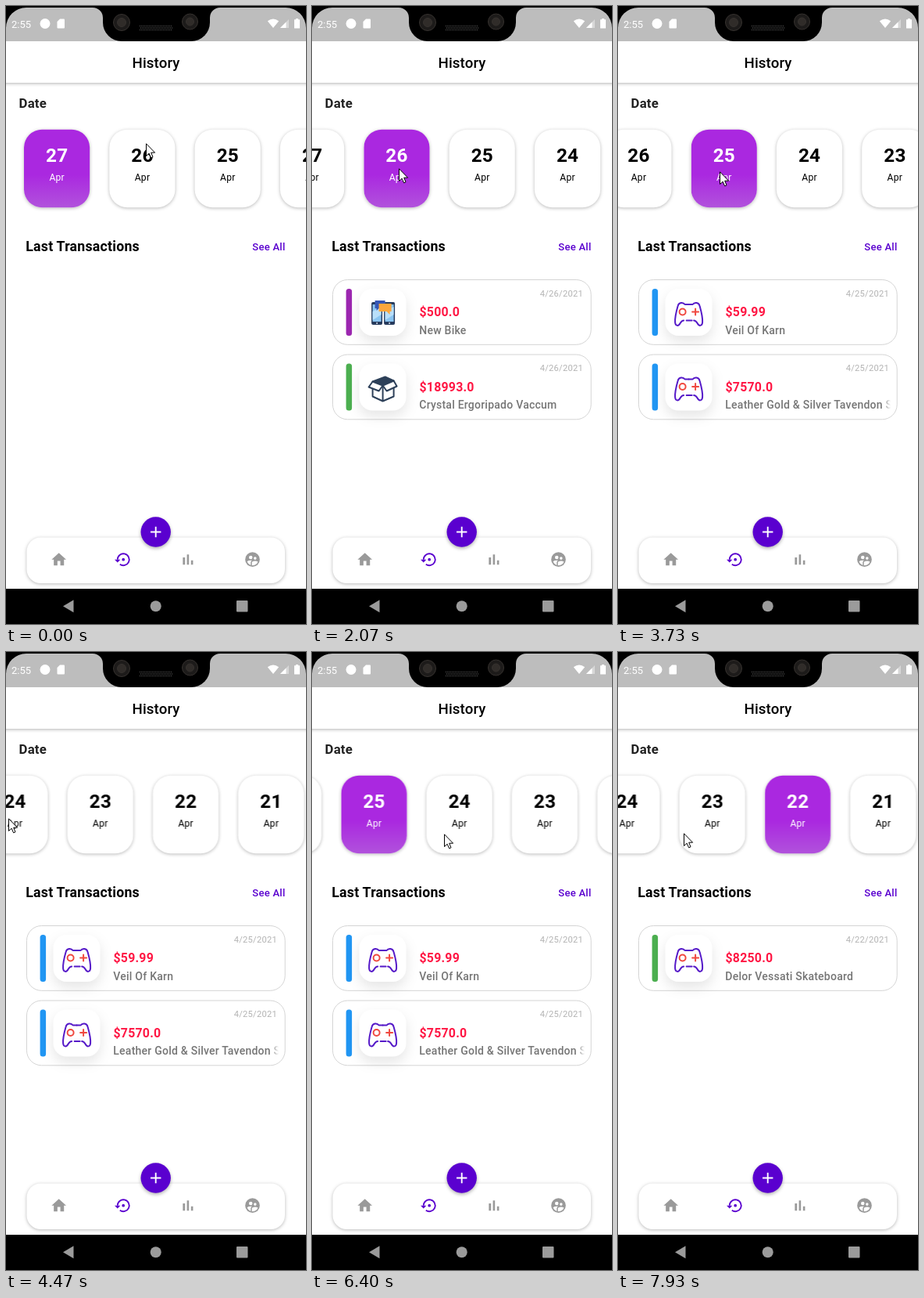
An HTML page that plays this animation: 384x789 px, repeating every 8 s.

```html
<!DOCTYPE html>
<html lang="en">
<head>
<meta charset="utf-8">
<title>History</title>
<style>
  html, body { margin: 0; width: 100%; height: 100%; overflow: hidden; background: #fff; }
  svg { display: block; font-family: Roboto, sans-serif; letter-spacing: .23px; }
  .b { font-weight: 700; }
  .m { font-weight: 500; }
  .c { text-anchor: middle; }
  .bar { filter: drop-shadow(0 1.5px 2px rgba(0,0,0,.3)); }
  .card { filter: drop-shadow(0 1.5px 2px rgba(0,0,0,.28)); }
  .tile { filter: drop-shadow(0 7px 8px rgba(0,0,0,.1)); }
  .fab { filter: drop-shadow(0 2px 2px rgba(0,0,0,.3)); }
</style>
</head>
<body>
<svg width="384" height="789" viewBox="0 0 384 789">
  <defs>
    <linearGradient id="violet" x2="0" y2="1">
      <stop offset=".58" stop-color="#aa28e0"/>
      <stop offset="1" stop-color="#b152dc"/>
    </linearGradient>
    <linearGradient id="fade" gradientUnits="userSpaceOnUse" x1="339" x2="349" y1="0" y2="0">
      <stop stop-color="#757575"/>
      <stop offset="1" stop-color="#757575" stop-opacity="0"/>
    </linearGradient>
    <clipPath id="row"><rect y="154" width="384" height="110"/></clipPath>
    <g id="pad" fill="none" stroke="#5519c8" stroke-width="2" stroke-linecap="round" stroke-linejoin="round">
      <path id="grip" d="M0-11H-5C-7-14-13-14-14-9C-16-2-18 6-17.500 12C-17 17-13 17-11 13C-9.500 10.500-8.500 9.500-6.500 9.500"/>
      <use href="#grip" transform="scale(-1 1)"/>
      <path d="M-3 9.500H4"/>
      <path stroke="#f0483f" d="M4.500-1.500H12.500M8.500-5.500V2.500M-4-1.500A4 4 0 1 1-12-1.500A4 4 0 1 1-4-1.500"/>
    </g>
    <g id="phones">
      <g id="phone">
        <rect x="-14.500" y="-14" width="14" height="29" rx="2" fill="#263a5c"/>
        <path fill="#8ac5f2" d="M-13-11H-2V11H-13Z"/>
        <path fill="#b9dffa" d="M-13-2L-2-8V2L-13 9Z"/>
        <circle cx="-7.500" cy="13" r="1" fill="#dfe9f5"/>
      </g>
      <use href="#phone" x="16"/>
      <path fill="#3556b5" d="M-10-16H3V-6H-5L-8-3V-6H-10Z"/>
      <path fill="#fba63c" d="M-5-12H11V-2H9V2L5-2H-5Z"/>
    </g>
    <g id="box" fill="#fff" stroke="#2d4059" stroke-width="2" stroke-linejoin="round">
      <path fill="#2d4059" d="M-13-8L3-14L14-9L0-3Z"/>
      <path d="M-13-7L0-2V17L-13 11ZM14-8L0-2V17L14 11Z"/>
      <path d="M-13-8L-18-1L-5 4L0-3ZM14-9L18-2L5 4L0-3Z"/>
    </g>
  </defs>

  <rect width="384" height="789" fill="#fff"/>
  <rect class="bar" x="-5" y="40" width="394" height="58" fill="#fff"/>
  <text class="m c" x="192" y="78.500" font-size="18.670" letter-spacing=".14">History</text>

  <rect width="384" height="45" fill="#bdbdbd"/>
  <path d="M0 0H384V28A26 26 0 0 0 358 2H274A13 13 0 0 0 261 15V21A24 24 0 0 1 237 45H148A24 24 0 0 1 124 21V15A13 13 0 0 0 111 2H26A26 26 0 0 0 0 28Z"/>
  <g fill="#1d1b1a" stroke="#36322f">
    <circle cx="148" cy="21" r="10.500"/><circle cx="235.500" cy="20" r="10"/>
    <circle cx="148" cy="21" r="5.500" fill="#302c29"/><circle cx="235.500" cy="20" r="5" fill="#302c29"/>
  </g>
  <path stroke="#454545" stroke-width="1.300" stroke-dasharray="1 1" d="M171 25.500H213M172 28H213M171 30.500H213"/>
  <g fill="#fff">
    <text x="7" y="28" font-size="13.070" letter-spacing="0">2:55</text>
    <circle cx="50" cy="22.500" r="6.500"/>
    <path d="M69 16.500H74Q75 16.500 75 17.500V27.500Q75 28.500 74 28.500H66.500Q65.500 28.500 65.500 27.500V20Z"/>
    <path d="M342 28L334.800 19.200Q342 13.800 349.200 19.200Z"/>
    <path d="M351 28L362 17V28Z" opacity=".4"/><path d="M351 28L358.500 20.500V28Z"/>
    <path d="M371 16H374V17.300H376V28.500H369V17.300H371Z"/>
  </g>

  <text class="b" x="16.500" y="130.300" font-size="16.800" fill="#222">Date</text>
  <g clip-path="url(#row)">
    <g id="strip"></g>
    <g fill="#5a00cc">
      <circle id="left" cx="-143" cy="209" r="165"/>
      <g transform="translate(384) scale(-1 1)"><circle id="right" cx="-143" cy="209" r="165"/></g>
    </g>
  </g>

  <text class="b" x="25.300" y="313" font-size="17.730">Last Transactions</text>
  <text class="m" x="357.500" y="312.300" font-size="13.070" fill="#5a00cf" text-anchor="end">See All</text>
  <g id="lists"></g>

  <rect class="card" x="26.500" y="678.500" width="330.500" height="58.500" rx="18" fill="#fff"/>
  <g fill="#9a9a9a">
    <path transform="translate(56.500 695.500) scale(.933)" d="M10 20V14H14V20H19V12H22L12 3L2 12H5V20Z"/>
    <g transform="translate(139 695.500) scale(.933)" fill="#5a00cf">
      <path d="M4 12A8 8 0 1 1 7.300 18.500" fill="none" stroke="#5a00cf" stroke-width="2"/>
      <path d="M0 12H8L4 16Z"/>
      <circle cx="12" cy="12" r="2"/>
    </g>
    <path transform="translate(221.700 695.500) scale(.933)" d="M5 9.200H8V19H5ZM10.600 5H13.400V19H10.600ZM16.200 13H19V19H16.200Z"/>
    <g transform="translate(304.300 695.500) scale(.933)">
      <circle cx="12" cy="12" r="10"/>
      <g fill="#fff">
        <circle cx="9.600" cy="9.100" r="2.400"/><circle cx="15.600" cy="10.300" r="1.900"/>
        <path d="M4.500 14.700Q6.500 12.800 11.500 13.200Q9.600 14 9.600 16V19.700Q6 18.500 4.500 14.700Z"/>
        <path d="M11.200 20V16Q11.500 14 15.600 13.800Q18 13.900 19.500 14.900Q17.500 20 11.200 20Z"/>
      </g>
    </g>
  </g>
  <circle class="fab" cx="191.700" cy="671.500" r="19.200" fill="#5a00cf"/>
  <path stroke="#fff" stroke-width="1.900" d="M185 671.500H198.400M191.700 664.800V678.200"/>

  <rect y="744" width="384" height="45"/>
  <g fill="#9b9b9b">
    <path d="M73 766.300L86.500 758.300V774.300Z"/>
    <circle cx="191.700" cy="766.300" r="7"/>
    <rect x="295" y="759" width="14.500" height="14.500" rx="1"/>
  </g>
  <path id="cursor" fill="#fff" stroke="#000" d="M.5 .8V16.500L4.200 13.200L6.600 18.800L9 17.800L6.700 12.200H11.600Z"/>
</svg>

<script>
const LOOP = 8000;
const PITCH = 109.3;
const END = 381.6;
const $ = id => document.getElementById(id);

// Eased moves: start, end, then where to
const pointer = [
  [60, 200, 157, 192], [200, 470, 264, 212], [800, 1635, 154, 207.5], [1800, 1930, 111, 207],
  [2070, 2270, 237, 209], [2620, 3220, 130, 211], [3800, 4070, 275, 211], [4200, 4470, 3, 212],
  [4530, 4980, 317, 223], [5930, 6350, 169, 232], [6930, 7270, 192, 219], [7560, 7930, 84, 231]
];
const swipes = [[860, 1635, 66], [2620, 3220, 148], [4230, 4470, END], [4530, 5140, 0], [5960, 6800, END]];
const taps = [[0, 27], [2070, 26], [3730, 25], [7400, 22]];

const purchases = {
  26: [['#9c27b0', 'phones', '$500.0', 'New Bike'],
       ['#4caf50', 'box', '$18993.0', 'Crystal Ergoripado Vaccum']],
  25: [['#2196f3', 'pad', '$59.99', 'Veil Of Karn'],
       ['#2196f3', 'pad', '$7570.0', 'Leather Gold &amp; Silver Tavendon Set']],
  22: [['#4caf50', 'pad', '$8250.0', 'Delor Vessati Skateboard']]
};

const face = (day, bg, ink) => `
  <rect x="23" y="157.700" width="84.200" height="99.500" rx="23" fill="${bg}"/>
  <g class="c" fill="${ink}">
    <text class="b" x="65.200" y="199.300" font-size="24.270">${day}</text>
    <text x="65.200" y="223.300" font-size="12.130">Apr</text>
  </g>`;

const dateCard = (day, i) => `
  <g transform="translate(${i * PITCH})">
    <g class="card">${face(day, '#fff', '#000')}</g>
    <g id="on${day}">${face(day, 'url(#violet)', '#fff')}</g>
  </g>`;

const purchase = (day, [color, icon, price, name], i) => `
  <g transform="translate(0 ${i * 95.5})">
    <rect x="26.500" y="349.500" width="330.700" height="82.800" rx="19" fill="#fff" stroke="#d4d4d4"/>
    <rect x="43.600" y="361" width="7.500" height="60" rx="3.500" fill="${color}"/>
    <rect class="tile" x="60.500" y="361" width="60" height="60" rx="17" fill="#fff"/>
    <use href="#${icon}" x="90.600" y="392"/>
    <text x="347" y="370.800" font-size="11.200" fill="#b3b3b3" text-anchor="end">4/${day}/2021</text>
    <text class="b" x="137.500" y="396" font-size="15.870" fill="#ff1744">${price}</text>
    <text class="m" x="137.300" y="418.700" font-size="14" fill="url(#fade)">${name}</text>
  </g>`;

const days = Array.from({ length: 7 }, (_, i) => 27 - i);
$('strip').innerHTML = days.map(dateCard).join('');
$('lists').innerHTML = Object.entries(purchases).map(([day, rows]) =>
  `<g id="list${day}">${rows.map((row, i) => purchase(day, row, i)).join('')}</g>`).join('');

const clamp = u => Math.min(1, Math.max(0, u));
const smooth = u => u * u * (3 - 2 * u);
const follow = (from, moves, col) => t => moves.reduce((value, move) =>
  value + (move[col] - value) * smooth(clamp((t - move[0]) / (move[1] - move[0]))), from);

// Overscroll glow: quick swell, decelerating retreat
const glow = (start, peak, end) => t => {
  const k = t < peak ? clamp((t - start) / (peak - start)) : clamp((end - t) / (end - peak)) ** 2;
  return { transform: `scale(${k}, 1)`, opacity: k * .29 };
};

const selected = t => taps.filter(tap => tap[0] <= t).pop()[1];
const shownOn = day => t => ({ opacity: +(selected(t) === day) });

// Fifteen poses a second, each held until the next
const times = Array.from({ length: 120 }, (_, i) => Math.round(i * 20 / 3) * 10);
function play(id, pose) {
  const steps = times.map(t => ({ ...pose(t), offset: t / LOOP, easing: 'step-end' }));
  steps.push({ ...pose(times[times.length - 1]), offset: 1 });
  $(id).animate(steps, { duration: LOOP, iterations: Infinity });
}

const x = follow(179, pointer, 2), y = follow(175, pointer, 3), scroll = follow(0, swipes, 2);
play('cursor', t => ({ transform: `translate(${Math.round(x(t))}px, ${Math.round(y(t))}px)` }));
play('strip', t => ({ transform: `translate(${-scroll(t)}px, 0)` }));
play('left', glow(5080, 5190, 5530));
play('right', glow(6780, 6910, 7260));
days.forEach(day => play('on' + day, shownOn(day)));
Object.keys(purchases).forEach(day => play('list' + day, shownOn(+day)));
</script>
</body>
</html>
```
